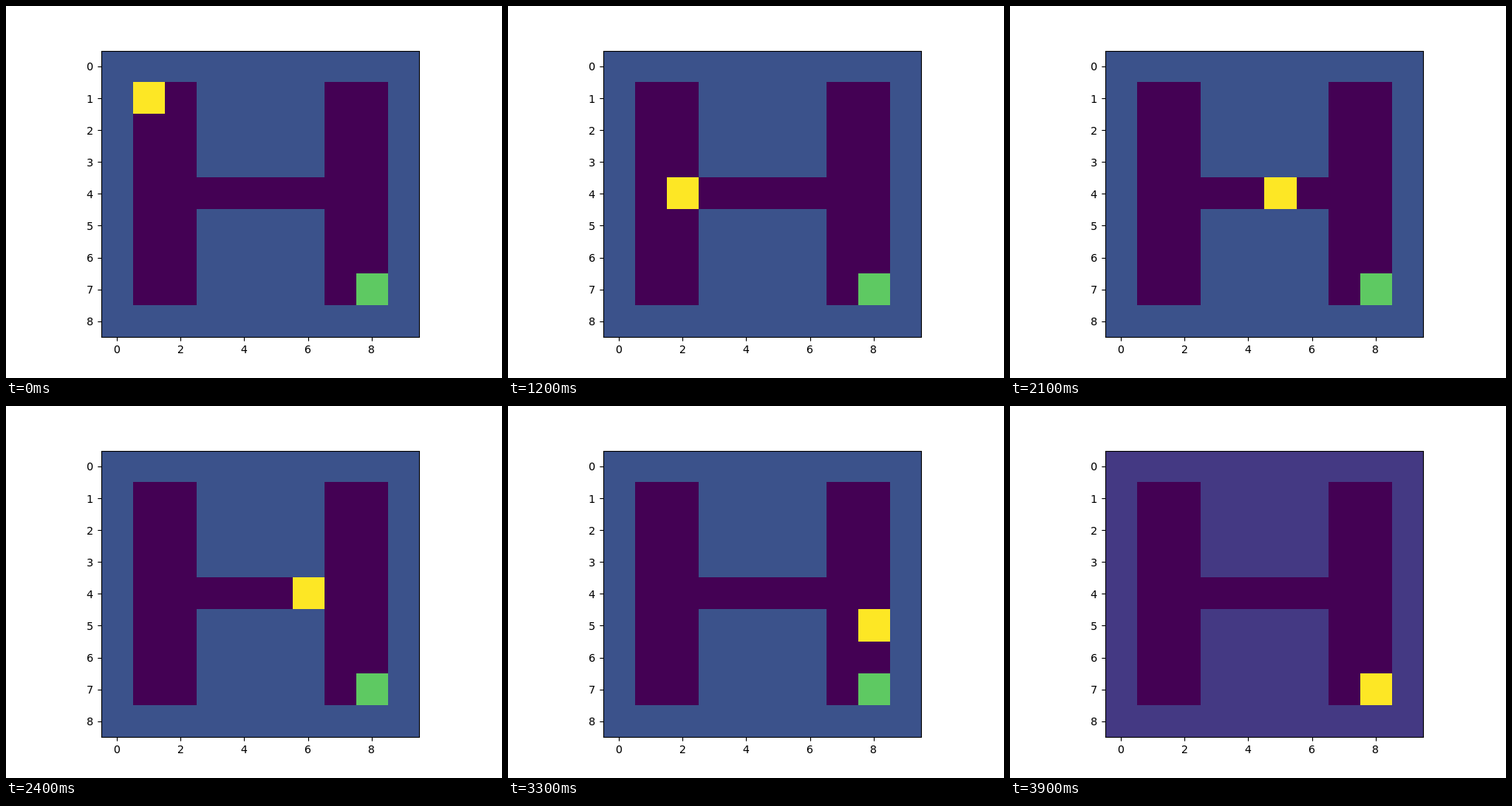
An HTML page that plays this animation: 640x480 px, repeating every 4200 ms.

```html
<!DOCTYPE html>
<html lang="en">
<head>
<meta charset="utf-8">
<title>Maze walk</title>
<style>
  html, body { margin: 0; width: 100%; height: 100%; overflow: hidden; background: #fff; }
  svg { display: block; }
  text { font: 13.889px "DejaVu Sans", sans-serif; }
  .line { fill: none; stroke: #000; stroke-width: 1.111; }
</style>
</head>
<body>
<svg id="plot" width="640" height="480" viewBox="0 0 640 480"></svg>
<script>
const svg = document.getElementById("plot");
const COLS = 10, ROWS = 9, STEP = 300;
const LEFT = 368 / 3, TOP = 57.6, CELL = 369.6 / ROWS;
const WALL = "#3b528b", WALL_END = "#443983", FLOOR = "#440154";
const GOAL = "#5ec962", AGENT = "#fde725";

function add(tag, attrs, text) {
  const el = document.createElementNS("http://www.w3.org/2000/svg", tag);
  for (const key in attrs) el.setAttribute(key, attrs[key]);
  if (text !== undefined) el.textContent = text;
  return svg.appendChild(el);
}

// Cell edges fall on whole pixels.
const edgeX = c => Math.ceil(LEFT + c * CELL - 1e-6);
const edgeY = r => Math.floor(TOP + r * CELL + 1e-6);
const snap = v => Math.floor(v + 0.5) + 0.5;

function box(c, r, w, h) {
  const x = edgeX(c), y = edgeY(r);
  return { x, y, width: edgeX(c + w) - x, height: edgeY(r + h) - y };
}
function place(el, c, r) {
  const b = box(c, r, 1, 1);
  for (const key in b) el.setAttribute(key, b[key]);
}

const wall = add("rect", { x: 123, y: 58, width: 411, height: 370 });
for (const room of [[1, 1, 2, 7], [3, 4, 4, 1], [7, 1, 2, 7]])
  add("rect", { ...box(...room), fill: FLOOR });
add("rect", { ...box(8, 7, 1, 1), fill: GOAL });
const agent = add("rect", { fill: AGENT });

add("rect", { class: "line", x: 123.5, y: 58.5, width: 410, height: 369 });
for (let c = 0; c < COLS; c += 2) {
  const x = LEFT + (c + 0.5) * CELL;
  add("path", { class: "line", d: `M${snap(x)} 427.5v5` });
  add("text", { x: Math.round(x - 4.42), y: 448 }, c);
}
for (let r = 0; r < ROWS; r++) {
  const y = TOP + (r + 0.5) * CELL;
  add("path", { class: "line", d: `M123.5 ${snap(y)}h-5` });
  add("text", { x: 104, y: Math.round(y + 5.32) }, r);
}

// Right, down, along the corridor, down to the goal.
const path = [[1, 1]];
for (const [dx, dy, n] of [[1, 0, 1], [0, 1, 3], [1, 0, 6], [0, 1, 3]])
  for (let i = 0; i < n; i++) {
    const [x, y] = path[path.length - 1];
    path.push([x + dx, y + dy]);
  }

function draw(now) {
  const i = Math.floor(now / STEP) % path.length;
  place(agent, ...path[i]);
  wall.setAttribute("fill", i === path.length - 1 ? WALL_END : WALL);
}
function tick() {
  draw(performance.now());
  requestAnimationFrame(tick);
}
draw(0);
requestAnimationFrame(tick);
</script>
</body>
</html>
```
